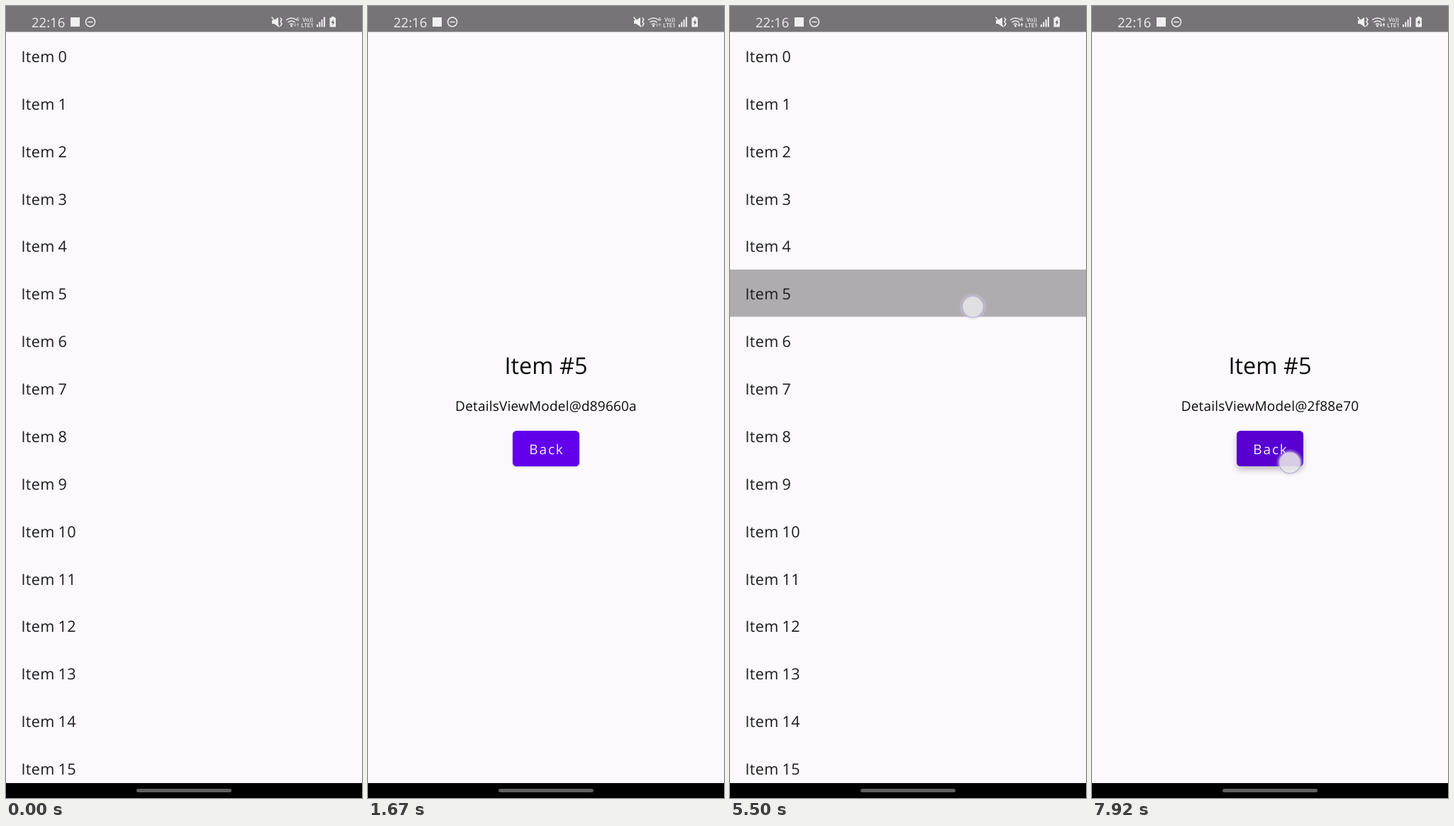
Recreate the animation shown at these times as an HTML page. Size 502 px wide and 1115 px high, loop 8000 ms.

```html
<!DOCTYPE html>
<html lang="en">
<head>
<meta charset="utf-8">
<title>List and details</title>
<style>
  html, body { margin: 0; width: 100%; height: 100%; overflow: hidden; background: #fbf9fb; }
  svg { display: block; width: 100vw; height: 100vh; }
  text { font-family: "Open Sans", sans-serif; text-rendering: geometricPrecision; }
  #list { font-size: 21.6px; letter-spacing: .35px; word-spacing: -1px; fill: #1c1b1d; }
  #details { text-anchor: middle; fill: #0c0c0d; }
  #title { font-size: 32.5px; }
  #model { font-size: 19px; letter-spacing: .2px; }
  #label { font-size: 19px; letter-spacing: 1.9px; fill: #f4eefe; }
  #status { fill: #f1f0f1; }
  .line { fill: none; stroke: #f1f0f1; stroke-width: 1.5; stroke-linecap: round; stroke-linejoin: round; }
  .tiny { font-size: 8px; font-weight: 600; }
</style>
</head>
<body>
<svg viewBox="0 0 502 1115">
  <defs>
    <clipPath id="rowClip"><rect y="371" width="502" height="66.5"/></clipPath>
    <clipPath id="buttonClip"><rect x="204" y="598" width="94" height="50" rx="5.5"/></clipPath>
    <radialGradient id="halo">
      <stop offset=".74" stop-color="#d6d2e4" stop-opacity="0"/>
      <stop offset=".76" stop-color="#d6d2e4" stop-opacity=".5"/>
      <stop offset="1" stop-color="#d6d2e4" stop-opacity="0"/>
    </radialGradient>
  </defs>
  <rect width="502" height="1115" fill="#fbf9fb"/>

  <g id="list">
    <g clip-path="url(#rowClip)"><circle id="rowRipple" fill="#aeacae"/></g>
  </g>

  <g id="details">
    <text id="title" x="251" y="518">Item #5</text>
    <text id="model" x="251" y="570"></text>
    <rect id="button" x="204" y="598" width="94" height="50" rx="5.5" fill="#6200eb"/>
    <g clip-path="url(#buttonClip)"><circle id="buttonRipple" fill="#000" fill-opacity=".11"/></g>
    <text id="label" x="252" y="631">Back</text>
  </g>

  <g id="touch">
    <circle r="20" fill="url(#halo)"/>
    <circle r="15" fill="#e6e4e7" fill-opacity=".9" stroke="#b3abd0" stroke-width="1.2"/>
  </g>

  <rect width="502" height="36.5" fill="#767476"/>
  <g id="status">
    <text x="36" y="29.5" font-size="18.5">22:16</text>
    <rect x="91" y="16" width="13" height="13"/>
    <g class="line">
      <circle cx="119" cy="22.5" r="6.5"/>
      <path d="M116 22.5h6M375 16l10 13M387 17l2 2-2 3 2 3-2 3"/>
      <path d="M395.5 19.5a11.5 11.5 0 0 1 14 0M398 22.7a7.5 7.5 0 0 1 9 0M400.4 25.6a4 4 0 0 1 4.2 0"/>
    </g>
    <path d="M375 20h3l6-4v13l-6-4h-3z"/>
    <circle cx="402.5" cy="28" r="1.5"/>
    <text x="409.5" y="20.5" font-size="7" font-weight="600">6</text>
    <path id="down" d="M407 24h1.2v2.5h1.3l-2 2.7-2-2.7h1.5z"/>
    <path id="up" d="M411 29h1.2v-2.5h1.3l-2-2.7-2 2.7h1.5z"/>
    <text class="tiny" x="418" y="21.5">Vo))</text>
    <text class="tiny" x="416" y="30">LTE1</text>
    <g id="signal"></g>
    <path d="M459 15h4v1.5h2v13h-8.5v-13h2.5z"/>
    <path d="M462.5 18.5l-4 5h2.5l-1.5 4 4-5h-2.5z" fill="#555355"/>
  </g>

  <rect y="1094" width="502" height="21" fill="#000"/>
  <rect x="184" y="1102" width="134" height="5" rx="2.5" fill="#616061"/>
</svg>

<script>
const LOOP = 8000;
const TICKS_PER_SECOND = 12;

// Times are in ticks: the row is pressed, details open, Back is pressed, details close.
const visits = [
  { press: 16, open: 18, back: 40, close: 48, row: [353.5, 418], button: [270, 632],
    model: "d89660a", trace: 0, arrows: .5 },
  { press: 63, open: 68, back: 89, close: 96, row: [342.5, 423.5], button: [279, 643],
    model: "2f88e70", trace: .1, arrows: 1 }
];
const REST = 4;

const $ = id => document.getElementById(id);
const set = (id, attrs) => {
  for (const name in attrs) $(id).setAttribute(name, attrs[name]);
};
const add = (parent, tag, attrs, text = "") => {
  const node = document.createElementNS("http://www.w3.org/2000/svg", tag);
  for (const name in attrs) node.setAttribute(name, attrs[name]);
  node.textContent = text;
  $(parent).append(node);
};
const clamp = v => Math.min(1, Math.max(0, v));

for (let i = 0; i < 16; i++) add("list", "text", { x: 21.4, y: 79 + i * 66.87 }, `Item ${i}`);
for (let i = 0; i < 4; i++) {
  const height = 3.5 * (i + 1);
  add("signal", "rect", { x: 438 + 3.3 * i, y: 29.5 - height, width: 2, height });
}

// A finger fades in over two ticks and out again once the screen has changed.
const tap = (n, down, up) => clamp((n - down + 1) / 2) * clamp(1 - (n - up + 1) / 2);

function draw(t) {
  const n = Math.floor(t / 1000 * TICKS_PER_SECOND + .1);
  const visit = visits.find(v => n < v.close + REST);
  const { press, open, back, close } = visit;
  const isOpen = n >= open && n < close;
  const returning = n >= back;
  const [x, y] = returning ? visit.button : visit.row;
  const spread = Math.sqrt(clamp((n - press) / (open - press - 1)));
  const lift = clamp((n - back) / 3);
  const finger = returning
    ? tap(n, back, close)
    : Math.max(tap(n, press, open), n > open ? visit.trace : 0);

  set("list", { visibility: isOpen ? "hidden" : "visible" });
  set("details", { visibility: isOpen ? "visible" : "hidden" });
  set("rowRipple", { cx: x, cy: y, r: n < open ? 520 * spread : 0 });
  set("buttonRipple", { cx: x, cy: y, r: 110 * lift });
  set("touch", { transform: `translate(${x} ${y})`, opacity: finger });
  set("down", { opacity: visit.arrows });
  set("up", { opacity: visit.arrows });
  $("model").textContent = `DetailsViewModel@${visit.model}`;
  $("button").style.filter =
    `drop-shadow(0 ${1.5 + 4 * lift}px ${1.2 + 3.3 * lift}px rgba(0,0,0,.24))`;
}

const begin = performance.now();
function tick() {
  draw((performance.now() - begin) % LOOP);
  requestAnimationFrame(tick);
}
tick();
</script>
</body>
</html>
```
